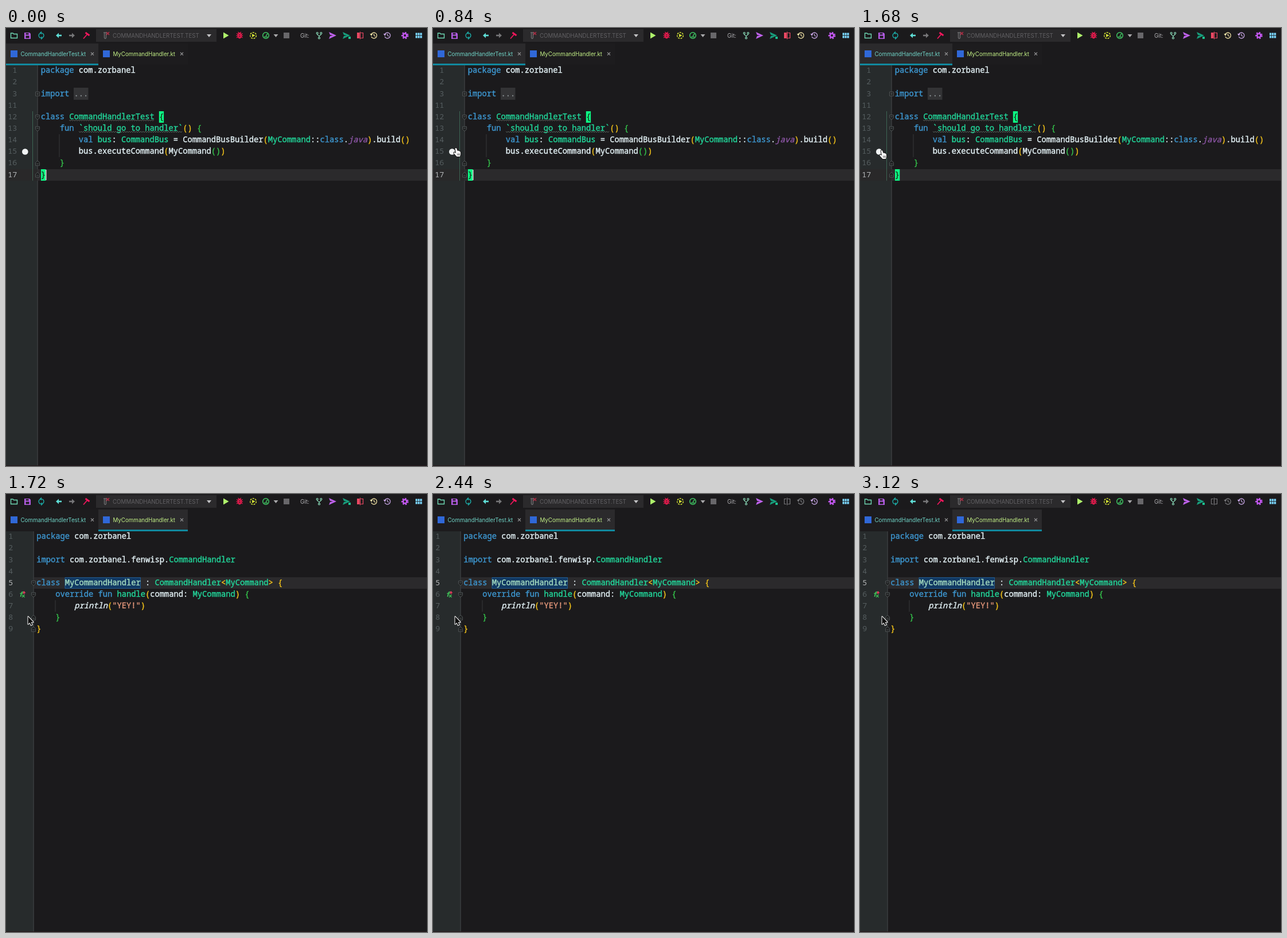
Recreate the animation shown at these times as an HTML page with a canvas. Size 734 by 763 pixels, loop 3.16 s.

```html
<!DOCTYPE html>
<html lang="en">
<head>
<meta charset="utf-8">
<title>Jump to handler</title>
<style>
html, body { margin: 0; width: 734px; height: 763px; overflow: hidden; background: #1b1a1c; }
canvas { display: block; }
</style>
</head>
<body>
<canvas id="stage" width="734" height="763"></canvas>
<script>
const ctx = document.getElementById('stage').getContext('2d');
const LOOP = 3160, STEP = 40, JUMP = 1720, GREY_ICONS = 2000;
const CHAR = 8.25, ROW = 20.15;
const MONO = '"Noto Sans Mono", "DejaVu Sans Mono", monospace';
const UI = 'Inter, Roboto, sans-serif';
const INK = {
  k: '#3d96cf', w: '#e3f1f5', g: '#22d69a', y: '#f2c21a', b: '#35c24b',
  p: '#8d56a6', s: '#df9478', d: '#16331f', l: '#a5dcc0', m: '#8b9194'
};

const rowY = row => 74 + row * ROW;

function box(x, y, w, h, color) {
  ctx.fillStyle = color;
  ctx.fillRect(x, y, w, h);
}

function fill(d, color) {
  ctx.fillStyle = color;
  ctx.fill(new Path2D(d));
}

function line(d, color, width = 1.3) {
  ctx.strokeStyle = color;
  ctx.lineWidth = width;
  ctx.stroke(new Path2D(d));
}

function ring(x, y, r, color, width = 1.3, from = 0, to = 7) {
  ctx.beginPath();
  ctx.arc(x, y, r, from, to);
  ctx.strokeStyle = color;
  ctx.lineWidth = width;
  ctx.stroke();
}

function disc(x, y, r, color) {
  ctx.beginPath();
  ctx.arc(x, y, r, 0, 7);
  ctx.fillStyle = color;
  ctx.fill();
}

function text(str, x, y, color, font, align = 'left') {
  ctx.font = font;
  ctx.textAlign = align;
  ctx.fillStyle = color;
  ctx.fillText(str, x, y);
}

const label = (str, x, y, color) => text(str, x, y, color, '9.75px ' + UI);

// Parts alternate colour key and text; an upper-case key means italic.
function code(left, row, col, ...parts) {
  for (let i = 0; i < parts.length; i += 2) {
    const key = parts[i], low = key.toLowerCase(), str = parts[i + 1];
    const font = (key === low ? '' : 'italic ') + '500 13.75px ' + MONO;
    const x = left + col * CHAR, y = rowY(row) + 4.2;
    text(str, x, y, INK[low], font);
    // A thin outline gives the medium weight.
    ctx.strokeStyle = INK[low];
    ctx.lineWidth = 0.4;
    ctx.strokeText(str, x, y);
    col += str.length;
  }
}

function wave(x, end, y) {
  let d = `M${x} ${y}`;
  for (let i = 1; x + i * 2 <= end; i++) d += `L${x + i * 2} ${y + (i % 2 ? 2 : 0)}`;
  line(d, '#66756d', 0.8);
}

function lineNumbers(numbers, right, current) {
  numbers.forEach((n, i) => text(n, right, rowY(i) + 4.2,
    n === current ? '#b3b5b7' : '#565e60', '13.3px ' + MONO, 'right'));
}

function fold(x, y, kind) {
  const shape = {
    plus: 'M-3.5-3.5H3.5V3.5H-3.5ZM-2 0H2M0-2V2',
    open: 'M-3.5-3.5H3.5V1.5L0 4.5L-3.5 1.5ZM-2-.5H2',
    close: 'M-3.5 4H3.5V-1.5L0-4.5L-3.5-1.5ZM-2 1H2'
  }[kind];
  ctx.save();
  ctx.translate(x, y + 0.5);
  box(-3.5, -3.5, 7, 7, '#1f2021');
  line(shape, '#4e5354', 1);
  ctx.restore();
}

function gutter(width) {
  box(0, 65, width, 698, '#272b2c');
  box(width, 65, 1, 698, '#4b4f50');
}

function chevron(x, color) {
  fill(`M${x - 4} 11H${x + 4}L${x} 16Z`, color);
}

function plane(x, color) {
  fill(`M${x - 6} 7L${x + 7} 13L${x - 6} 19L${x - 4} 14L${x + 1} 13L${x - 4} 12Z`, color);
}

function arrow(x, dir, color) {
  line(`M${x - dir * 5} 13H${x + dir * 2}`, color, 2.6);
  fill(`M${x + dir * 5} 13L${x} 8.5V17.5Z`, color);
}

function clock(x, color) {
  ring(x, 13, 5, color, 1.3, -2.7, 2.7);
  fill(`M${x - 7} 10H${x - 2}L${x - 4.5} 14Z`, color);
  line(`M${x} 10V13L${x + 2.5} 14.5`, color, 1.2);
}

function toolbar(t) {
  const grey = t >= GREY_ICONS;
  line('M8.5 9H12L13.5 10.5H19.5V17.5H8.5Z', '#6fd9b4', 1.4);

  fill('M32 8H41L43 10V19H32Z', '#b45ce4');
  box(34.5, 9, 5, 2.5, '#1c1b1d');
  box(34.5, 13.5, 6, 4, '#1c1b1d');

  ring(61.5, 13, 4.4, '#1ca5a0', 1.5, -1.4, 1.1);
  ring(61.5, 13, 4.4, '#1ca5a0', 1.5, 1.75, 4.25);
  fill('M62 5.5V11.5L58.5 8.5ZM61 14.5V20.5L64.5 17.5Z', '#1ca5a0');

  arrow(92, -1, '#5fded6');
  arrow(115, 1, '#767678');

  line('M135 18.5L142 10.5', '#ee175c', 1.8);
  line('M138.5 8L145.5 13', '#ee175c', 2.8);

  box(157, 2, 210, 22, '#2b2a2c');
  line('M170 8H176M171.5 8V17Q173 20 174.5 17V8', '#6c6c6e', 1.4);
  line('M175 7L180 12M180 7L175 12', '#b52c45', 1.5);
  label('COMMANDHANDLERTEST.TEST', 186, 16.6, '#626164');
  chevron(354, '#c3c3c5');

  fill('M379 7.5L388.5 13L379 18.5Z', '#aef26b');

  fill('M404 10.5Q407.3 6 410.5 10.5V16Q407.3 21 404 16Z', '#f31b50');
  line('M402 9.5L412.5 17M412.5 9.5L402 17M401.5 13.3H413M404.5 7L407 9.5L410 7', '#f31b50', 1.2);
  line('M405.5 12H409M405.5 15H409', '#1c1b1d', 1);

  ctx.setLineDash([3, 1.6]);
  ring(431, 13, 5.3, '#d1df35', 1.5);
  ctx.setLineDash([]);
  fill('M429 10L434.5 13L429 16Z', '#d1df35');

  ring(453, 13, 5.3, '#40c864', 1.5);
  line('M453 14L456 10M450 15.5H456', '#40c864', 1.4);
  chevron(470.5, '#a9a9ab');
  box(484, 8, 10, 10, '#68676a');

  label('Git:', 513, 16.6, '#b6b5b8');
  ring(542.7, 9, 1.5, '#8fe3bf', 1.2);
  ring(549.3, 9, 1.5, '#8fe3bf', 1.2);
  ring(546, 17.5, 1.5, '#8fe3bf', 1.2);
  line('M542.7 10.5Q543 13 546 13.5V16M549.3 10.5Q549 13 546 13.5', '#8fe3bf', 1.2);

  plane(569, '#bf62ec');
  plane(593, '#189f7d');
  box(597, 15, 4, 4, '#1cc08f');

  const diff = grey ? '#77777a' : '#ef4964';
  if (grey) line('M616 8.5H612.5V17.5H616', diff, 1.1);
  else box(612, 8, 4.5, 10, diff);
  line('M618.5 8.5H622.5V17.5H618.5M617.5 6.5V19.5', diff, 1.2);

  clock(641.5, grey ? '#77777a' : '#eee0a3');
  clock(665, '#c5a4e2');

  ctx.setLineDash([2.4, 2.2]);
  ring(695.5, 13, 5, '#c257ef', 2.6);
  ctx.setLineDash([]);
  ring(695.5, 13, 3.2, '#c257ef', 2.6);

  for (let i = 0; i < 6; i++) box(714 + i % 3 * 4, 8.5 + (i / 3 | 0) * 5, 3.3, 4, '#79d2f7');
}

function tab(x, width, name, color, active) {
  box(x, 27, width, 37, active ? '#2b2a2c' : '#1d1c1e');
  if (active) box(x, 62, width, 3, '#11899f');
  box(x + 8, 39, 12, 12, '#3068d8');
  label(name, x + 25.5, 48.5, color);
  const cx = x + width - 10.5;
  line(`M${cx - 2.5} 42.5l5 5m0-5l-5 5`, '#909092', 1.1);
}

function testFile(t) {
  const x = 60.7;
  gutter(54.5);
  box(0, 246, 55, 20, '#292829');
  box(56, 246, 678, 20, '#2b2a2c');
  lineNumbers([1, 2, 3, 11, 12, 13, 14, 15, 16, 17], 19.3, 17);
  box(46, 145, 1, 121, '#3d6554');
  box(92.5, 185, 1, 40, '#38393a');
  disc(33.3, 215.5, 5.3, '#f1f4f5');
  fold(55, rowY(2), 'plus');
  fold(55, rowY(4), 'open');
  fold(55, rowY(5), 'open');
  fold(55, rowY(8), 'close');
  fold(55, rowY(9), 'close');

  box(118, 104, 25.5, 21, '#333335');
  box(266.8, 145, 8.3, 20, '#0cfb84');
  box(61, 246, 8.3, 20, '#0cfb84');

  code(x, 0, 0, 'k', 'package ', 'w', 'com.zorbanel');
  code(x, 2, 0, 'k', 'import ', 'm', '...');
  code(x, 4, 0, 'k', 'class ', 'g', 'CommandHandlerTest ', 'd', '{');
  code(x, 5, 4, 'k', 'fun ', 'g', '`should go to handler`', 'y', '() ', 'b', '{');
  code(x, 6, 8, 'k', 'val ', 'g', 'bus', 'w', ': ', 'g', 'CommandBus', 'w', ' = CommandBusBuilder',
    'y', '(', 'g', 'MyCommand', 'w', '::', 'k', 'class', 'w', '.', 'P', 'java', 'y', ')', 'w', '.build', 'y', '()');
  code(x, 7, 8, 'w', 'bus.executeCommand', 'y', '(', 'w', 'MyCommand', 'b', '()', 'y', ')');
  code(x, 8, 4, 'b', '}');
  code(x, 9, 0, 'd', '}');
  wave(110, 258, 160);
  wave(127, 307, 180);

  const caretOn = Math.floor((t + 240) / 500) % 2 === 0;
  if (caretOn) box(69, 247, 1.5, 18, '#d5d5d5');
}

function handlerFile() {
  const x = 53.2;
  gutter(47.5);
  box(49, 145, 685, 20, '#2b2a2c');
  lineNumbers([1, 2, 3, 4, 5, 6, 7, 8, 9], 12.3, 5);
  box(85.5, 185, 1, 20, '#38393a');
  text('f', 22, 178.5, '#3fc558', 'italic 600 12px ' + MONO);
  line('M28 175.5L32.5 180M32.5 175.5L28 180', '#3fc558', 1.2);
  line('M31.5 174.5V171', '#e8375d', 1.5);
  fill('M28.5 172.5L31.5 169L34.5 172.5Z', '#e8375d');
  fold(48, rowY(4), 'open');
  fold(48, rowY(5), 'open');
  fold(48, rowY(7), 'close');
  fold(48, rowY(8), 'close');

  box(102.5, 145, 132.5, 20, '#113963');
  line('M103 145.5H234.5V164.5H103Z', '#24598c', 1);

  code(x, 0, 0, 'k', 'package ', 'w', 'com.zorbanel');
  code(x, 2, 0, 'k', 'import ', 'w', 'com.zorbanel.fenwisp.', 'g', 'CommandHandler');
  code(x, 4, 0, 'k', 'class ', 'l', 'MyCommandHandler', 'w', ' : ', 'g', 'CommandHandler',
    'y', '<', 'g', 'MyCommand', 'y', '> {');
  code(x, 5, 4, 'k', 'override fun ', 'g', 'handle', 'y', '(', 'w', 'command: ', 'g', 'MyCommand',
    'y', ') ', 'b', '{');
  code(x, 6, 8, 'W', 'println', 'y', '(', 's', '"YEY!"', 'y', ')');
  code(x, 7, 4, 'b', '}');
  code(x, 8, 0, 'y', '}');
}

// Time, x and y of the pointer tip.
const PATH = [
  [200, 206, 462], [360, 189.5, 424], [580, 189.5, 424], [800, 40, 209],
  [1000, 40, 209], [1160, 38, 213], [LOOP, 38, 213]
];

function pointer(t) {
  const i = PATH.findIndex(p => p[0] > t);
  if (i < 1) return;
  const [t0, x0, y0] = PATH[i - 1], [t1, x1, y1] = PATH[i];
  const u = (t - t0) / (t1 - t0), e = u * u * (3 - 2 * u);
  ctx.save();
  ctx.translate(x0 + (x1 - x0) * e, y0 + (y1 - y0) * e);
  ctx.lineJoin = 'round';
  if (t >= 780 && t < JUMP) {
    const hand = 'M-1.5 1Q0-1 1.3 1L2.6 5Q4 4 4.8 5.2Q6 4.5 6.6 6Q7.8 5.6 8 7.5L8.2 11L7 15H1.5L-3.5 9.5Q-4 7.5-2.5 7.5L0 9Z';
    line(hand, '#151515', 1.8);
    fill(hand, '#f5f5f5');
    line('M2.8 9.5V13M4.6 9.5V13M6.4 9.5V13', '#333', 0.7);
  } else {
    const tip = 'M.5.5V13.8L3.5 11L5.5 15.6L7.7 14.7L5.7 10.2H9.7Z';
    line(tip, '#f5f5f5', 2);
    fill(tip, '#0c0c0c');
  }
  ctx.restore();
}

function draw(now) {
  const t = Math.floor(now % LOOP / STEP) * STEP;
  const jumped = t >= JUMP;
  box(0, 0, 734, 763, '#1b1a1c');
  toolbar(t);
  tab(0, 161, 'CommandHandlerTest.kt', '#6fd3c6', !jumped);
  tab(161, 156, 'MyCommandHandler.kt', '#c2ef86', jumped);
  if (jumped) handlerFile();
  else testFile(t);
  box(0, 762, 734, 1, '#26171a');
  pointer(t);
}

const start = performance.now();
function tick() {
  draw(performance.now() - start);
  requestAnimationFrame(tick);
}
tick();
</script>
</body>
</html>
```
